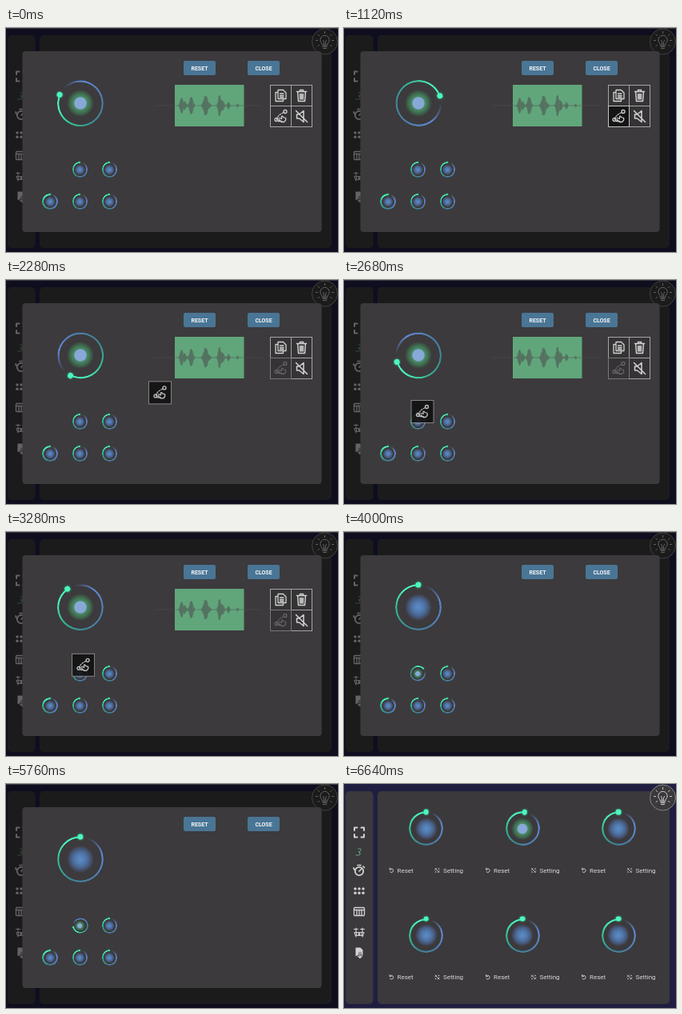
Animation of 415x280 px, one loop 6680 ms. Source, as an HTML page:

```html
<!DOCTYPE html>
<html lang="en">
<head>
<meta charset="utf-8">
<title>Loop pads</title>
<style>
html, body { margin: 0; width: 100%; height: 100%; overflow: hidden; background: #201e40; }
#stage { position: relative; width: 415px; height: 280px; overflow: hidden; }
.layer, .layer > svg { position: absolute; left: 0; top: 0; width: 415px; height: 280px; }
svg { overflow: visible; font-family: Roboto, Arial, sans-serif; }
.line { fill: none; stroke: #d2d2d2; stroke-width: 1.3; stroke-linecap: round; stroke-linejoin: round; }
.solid { fill: #d2d2d2; }
.label { font-size: 8px; fill: #d8d8d8; }
.button { font-size: 7px; font-weight: 700; fill: #f4f6f8; text-anchor: middle; }
.cell { fill: #353335; stroke: #a5a5a5; stroke-width: 1; }
.ring, .ring * { position: absolute; }
.spin { inset: 0; }
.trail {
  inset: 0; border-radius: 50%;
  background: conic-gradient(transparent 0 18deg, #5f86d0 75deg, #4d7cac 145deg, #3e8492 205deg, #35b492 265deg, #4af2bc 325deg 360deg);
}
.head { left: 50%; border-radius: 50%; background: #4df5bd; box-shadow: 0 0 3px #2fb98d; transform: translate(-50%, -50%); }
.core { left: 50%; top: 50%; border-radius: 50%; transform: translate(-50%, -50%);
  background: radial-gradient(closest-side, #5c8cc8 0, #527bb0 35%, #4a6590 62%, #434c63 84%, transparent); }
.playing .core { background: radial-gradient(closest-side, #88a8d8 0 42%, #4a8a68 48%, #407353 68%, #3c5545 86%, transparent); }
</style>
</head>
<body>
<div id="stage">
  <div class="layer" id="home"></div>
  <div class="layer" id="modal"></div>
</div>
<script>
const LOOP = 6680, HOVER = 960, DRAG = 1440, DROP = 3520, CLOSE = 5800;
// time, degrees clockwise from the top
const TURN = [[0, 293], [1120, 431], [1920, 525], [2680, 613.5], [6640, 1086], [6680, 1090.8]];
// time, tile centre
const PATH = [[DRAG, 343, 110], [1920, 278, 119.5], [2680, 98, 164.5], [DROP, 96, 167]];

const home = document.getElementById('home');
const modal = document.getElementById('modal');

function at(keys, t) {
  let i = 1;
  while (i < keys.length - 1 && t > keys[i][0]) i++;
  const a = keys[i - 1], b = keys[i];
  const k = Math.min(1, Math.max(0, (t - a[0]) / (b[0] - a[0])));
  return a.slice(1).map((v, j) => v + (b[j + 1] - v) * k);
}

const line = (d, extra = '') => `<path class="line" d="${d}" ${extra}/>`;
const disc = (x, y, r) => `<circle class="solid" cx="${x}" cy="${y}" r="${r}"/>`;
const put = (x, y, body, extra = '') => `<g transform="translate(${x} ${y})" ${extra}>${body}</g>`;
const box = (x, y, w, h, r, fill) => `<rect x="${x}" y="${y}" width="${w}" height="${h}" rx="${r}" fill="${fill}"/>`;

const icons = {
  full: line('M-6-2.5V-6H-2.5M2.5-6H6V-2.5M6 2.5V6H2.5M-2.5 6H-6V2.5', 'style="stroke-width:2"'),
  swirl: line('M-1-4Q3-5 2-2Q1 0-1 0Q2 0 1 3Q-1 5-4 4', 'style="stroke:#62a98a;stroke-width:1"'),
  timer: '<circle class="line" cy="1" r="5.2" style="stroke-width:1.8"/>' + line('M0 1L2.5-1.5M-2-6.5H2M5-5L6.5-3.5M-6-1L-7-3', 'style="stroke-width:1.7"'),
  dots: [-5, 0, 5].map(x => disc(x, -2.6, 1.7) + disc(x, 2.8, 1.7)).join(''),
  piano: '<rect class="line" x="-6.5" y="-5" width="13" height="10" rx="1"/>' + line('M-6-2H6M-3-2V4.5M0-2V4.5M3-2V4.5'),
  drums: line('M-6.5-4H-1.5M1.5-4H6.5M-4-5.5V-1M4-5.5V-1M-5 0H5M-3.5 0V4H3.5V0M-4 5.5L-6 0M4 5.5L6 0', 'style="stroke-width:1.1"') + disc(0, 2, 1.6),
  file: '<path class="solid" d="M-4.5-6.5H1.5L4.5-3.5V4H-4.5Z"/>' + line('M1 0V6M-1.5 4L1 6.5L3.5 4', 'style="stroke:#3b393b;stroke-width:3"') + line('M1-1V6M-1.5 4L1 6.5L3.5 4'),
  bulb: line('M-3 4Q-3 2-5 0A5.6 5.6 0 1 1 5 0Q3 2 3 4ZM-2.5 6H2.5M-2 8H2M-1 4V0L-2-2M1 4V0L2-2', 'style="stroke-width:1"')
    + line('M0-11V-13M-7-8L-8.5-9.5M7-8L8.5-9.5M-9-2H-11M9-2H11M-7 4L-8.5 5M7 4L8.5 5', 'style="stroke-width:1"'),
  reset: line('M-2-1.5A2.4 2.4 0 1 1-2 1.8M-2.4-3V-1H-.4', 'style="stroke-width:.9"'),
  setting: line('M-2.5-2.5L2.5 2.5M-2.8-.5L-.8-2.5M.8 2.5L2.8.5', 'style="stroke-width:.9"') + disc(2, -2, .8) + disc(-2, 2, .8),
  copy: line('M-3.5-7H3L6.5-3.5V4H-3.5ZM-3.5-4H-6.5V7H3V4M-1-2.5H3.5M-1 0H3.5M-1 2H3.5'),
  trash: line('M-6-5H6M-2-5V-7H2V-5M-4.8-4.5L-4 7H4L4.8-4.5M-1.8-2V4.5M0-2V4.5M1.8-2V4.5', 'style="stroke-width:1.5"'),
  move: line('M-5 4Q-4-2 4-5', 'stroke-dasharray="2 1.5" style="stroke-width:1.1"')
    + '<circle class="line" cx="-5.5" cy="4" r="2"/><circle class="line" cx="5.5" cy="-6" r="2"/>'
    + line('M-2 2L1 3V0Q2-1 3 1L6 2Q7 5 4 7H1Q-1 6-2 4M-3 6H1'),
  mute: line('M-6-2.5H-3L2.5-7V7L-3 2.5H-6ZM-7-7L7 7', 'style="stroke-width:1.5"'),
};

function ring(parent, x, y, r, w, head, core) {
  const el = document.createElement('div');
  const size = 2 * r;
  const mask = `radial-gradient(closest-side, transparent ${r - w - .3}px, #000 ${r - w + .3}px)`;
  el.className = 'ring';
  el.style.cssText = `left:${x - r}px;top:${y - r}px;width:${size}px;height:${size}px`;
  el.innerHTML = `<div class="core" style="width:${2 * core}px;height:${2 * core}px"></div>
    <div class="spin"><div class="trail" style="-webkit-mask:${mask};mask:${mask}"></div>
    <div class="head" style="top:${w / 2}px;width:${2 * head}px;height:${2 * head}px"></div></div>`;
  parent.append(el);
  const spin = el.querySelector('.spin');
  return (angle, playing) => {
    el.classList.toggle('playing', playing);
    spin.style.transform = `rotate(${playing ? angle : 0}deg)`;
  };
}

function wave() {
  const bursts = [[219.5, 11, 1.7], [223, 6, 2], [231.5, 12, 2], [249.5, 15, 2.3], [253, 5, 2], [267, 15, 1.6], [270, 8, 2], [278, 5, 1.4], [289.5, 3, .9]];
  let seed = 7, d = '';
  for (let x = 212; x < 297; x += .75) {
    seed = seed * 16807 % 2147483647;
    const h = bursts.reduce((m, [c, a, s]) => Math.max(m, a * Math.exp(-(((x - c) / s) ** 2) / 2)), .4);
    const k = h * (.72 + .28 * seed / 2147483647);
    d += `M${x} ${97 - k}V${97 + k}`;
  }
  return `<path d="${d}" stroke="#53675b" stroke-width=".8"/>`;
}

const pads = [55.5, 189].flatMap(y => [102.5, 223, 343].map(x => [x, y]));
const side = ['full', 'swirl', 'timer', 'dots', 'piano', 'drums', 'file'];
const sideY = [60.5, 85, 108, 133.5, 159.5, 185.5, 211];

home.innerHTML = '<svg>' + box(0, 0, 415, 280, 0, '#201e40')
  + box(2, 9, 34.5, 266, 5, '#3b393b') + box(42, 9, 365, 266, 5, '#3b393b')
  + side.map((n, i) => put(19, sideY[i], icons[n])).join('')
  + pads.map(([x, y]) => put(x - 43, y + 52.5, icons.reset) + put(x + 14, y + 52.5, icons.setting)
    + `<text class="label" x="${x - 36}" y="${y + 55.3}">Reset</text><text class="label" x="${x + 21.5}" y="${y + 55.3}">Setting</text>`).join('')
  + '<circle cx="398.5" cy="17" r="16" fill="#3b393b" stroke="#858585"/>' + put(398.5, 17.5, icons.bulb) + '</svg>';
const homeRings = pads.map(([x, y]) => ring(home, x, y, 21.5, 2.4, 3.4, 14));

const button = (x, text) => box(x, 41, 40, 18, 2, '#4a7595') + `<text class="button" x="${x + 20}" y="52.6">${text}</text>`;
const cell = (x, y, name, id = '') => put(x, y, `<rect class="cell" x="-13" y="-13" width="26" height="26"/><g>${icons[name]}</g>`, id);

modal.innerHTML = '<svg>' + box(0, 0, 415, 280, 0, 'rgba(0,0,0,.52)') + box(0, 0, 415, 1, 0, '#3b3b40')
  + box(20.5, 29, 374, 226, 4, '#3c3a3c') + button(222, 'RESET') + button(302, 'CLOSE')
  + '<g id="tools"><path d="M185 97H320" stroke="#4b494b" stroke-width=".8"/>'
  + box(211, 71, 86.5, 52, 0, '#61a67b') + wave()
  + cell(343.5, 84.5, 'copy') + cell(369.5, 84.5, 'trash') + cell(369.5, 110.5, 'mute') + cell(343.5, 110.5, 'move', 'id="mover"') + '</g></svg>';
const bigRing = ring(modal, 93.5, 94, 29.2, 2.6, 3.6, 17);
const smallRings = [[92.3, 177], [129.3, 177], [55, 217], [92.3, 217], [129.3, 217]]
  .map(([x, y]) => ring(modal, x, y, 9.8, 2, 1.1, 6.3));
modal.insertAdjacentHTML('beforeend', '<svg id="tile" opacity=".9"><rect x="-14" y="-14" width="28" height="28" fill="#121212" stroke="#8e8e8e"/>' + icons.move + '</svg>');

const tools = document.getElementById('tools');
const [moverBox, moverIcon] = document.getElementById('mover').children;
const tile = document.getElementById('tile');

function draw(t) {
  const angle = at(TURN, t)[0];
  const dragging = t >= DRAG && t < DROP;
  const hover = t >= HOVER && t < DRAG;
  modal.style.display = t < CLOSE ? '' : 'none';
  tools.style.display = t < DROP ? '' : 'none';
  moverBox.style.fill = hover ? '#151515' : '';
  moverBox.style.stroke = hover ? '#c4c4c4' : dragging ? '#777' : '';
  moverIcon.style.opacity = dragging ? .3 : 1;
  tile.style.display = dragging ? '' : 'none';
  const [x, y] = at(PATH, t);
  tile.style.transform = `translate(${x}px, ${y}px)`;
  bigRing(angle, t < DROP);
  smallRings.forEach((set, i) => set(angle, i === 0 && t >= DROP));
  homeRings.forEach((set, i) => set(angle, i === 1));
}

const start = performance.now();
function tick() {
  draw((performance.now() - start) % LOOP);
  requestAnimationFrame(tick);
}
tick();
</script>
</body>
</html>
```
